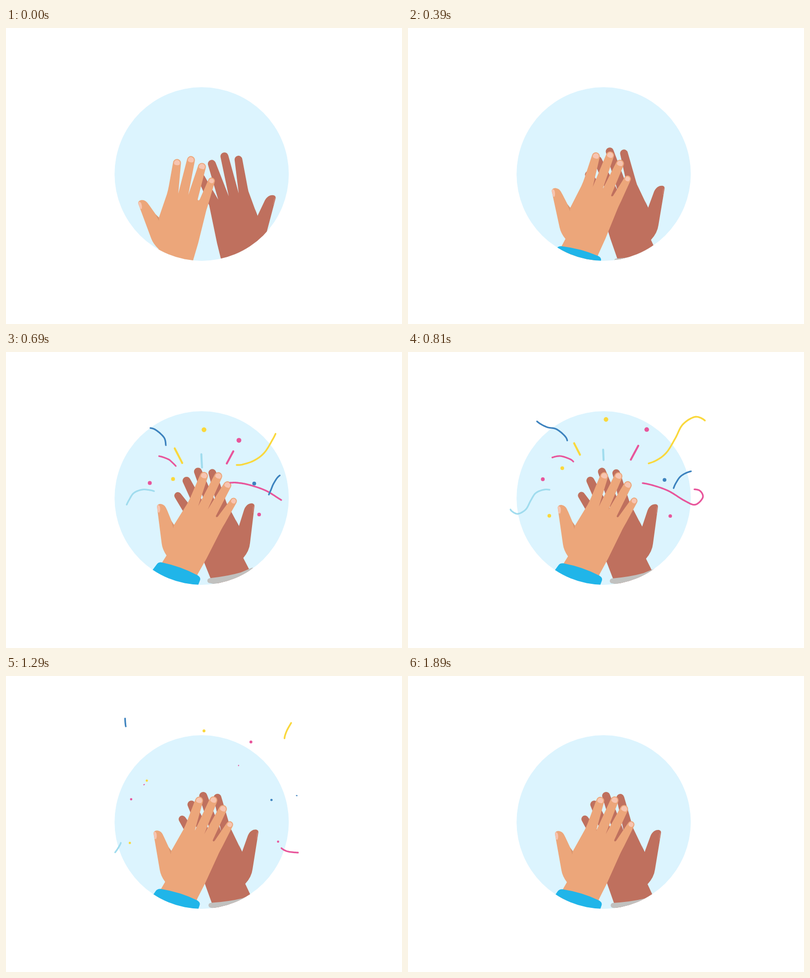
Recreate the animation shown at these times as an HTML page with a canvas. Size 800 by 600 pixels, loop 2.34 s.

```html
<!DOCTYPE html>
<html lang="en">
<head>
<meta charset="utf-8">
<title>High five</title>
<style>
html, body { margin: 0; width: 100%; height: 100%; overflow: hidden; background: #fff; }
canvas { display: block; width: 800px; height: 600px; }
</style>
</head>
<body>
<canvas id="stage" width="800" height="600"></canvas>
<script>
const ctx = document.getElementById('stage').getContext('2d');
const LOOP = 2340, STEP = 30, REST = 1890, CLAP = 500;
const YELLOW = '#fad83c', PINK = '#e8559b', BLUE = '#3c82be', PALE = '#a0dcee';
const RAD = Math.PI / 180;

function fill(color, d) {
  ctx.fillStyle = color;
  ctx.fill(new Path2D(d));
}

// fingers: tip x, tip y, radius, lean, then the web after the finger
function handPath(start, fingers, rest) {
  const p = new Path2D(start);
  for (const [x, y, r, lean, wx, wy] of fingers) {
    p.arc(x, y, r, Math.PI + lean, 2 * Math.PI + lean);
    p.lineTo(wx, wy);
  }
  const shape = new Path2D();
  shape.addPath(p);
  return { shape: p, rest };
}

const lightFingers = [
  [388.5, 252.8, 8, .29, 380, 314.5],
  [417.3, 252, 8, .38, 399.5, 320.5],
  [436.7, 269.5, 8, .44, 416.5, 333],
  [450.7, 301, 6.8, .5, 436, 346]
];
const darkFingers = [
  [357.5, 290, 7.2, -.55, 396, 331.5],
  [376.3, 260.5, 8, -.42, 416.5, 322.7],
  [400.2, 243, 8, -.34, 436, 315],
  [429, 246.8, 7.8, -.24, 453, 302]
];

function addFingers(list) {
  for (const [x, y, r, lean, wx, wy] of list) {
    ctx.arc(x, y, r, Math.PI + lean, 2 * Math.PI + lean);
    ctx.lineTo(wx, wy);
  }
}

function lightHand() {
  ctx.beginPath();
  ctx.moveTo(297, 321);
  ctx.bezierCurveTo(296, 315, 303, 313.5, 306, 314.5);
  ctx.bezierCurveTo(313, 316, 315, 321, 318, 327);
  ctx.lineTo(332, 357);
  ctx.lineTo(357, 312);
  ctx.quadraticCurveTo(361, 304, 364, 296);
  addFingers(lightFingers.slice(0, 3));
  ctx.quadraticCurveTo(417, 337, 420.5, 334);
  addFingers(lightFingers.slice(3));
  ctx.quadraticCurveTo(430, 357, 427, 364);
  for (const [x, y] of [[402, 420], [386, 452], [380, 470], [305, 450], [313, 432], [321, 418]]) ctx.lineTo(x, y);
  ctx.quadraticCurveTo(312, 406, 310, 394);
  ctx.closePath();
  ctx.fillStyle = '#eca67a';
  ctx.fill();

  fill('#d9956e', 'M332 362L327 347L333 355Z');
  fill('#f7c4b0', 'M297.3 320C297 315 302 316 303 321Q304.2 327 302 332L299 331Z');
  for (const [x, y, r, lean] of lightFingers) {
    const n = r - 1.9;
    ctx.save();
    ctx.translate(x, y);
    ctx.rotate(lean);
    ctx.beginPath();
    ctx.arc(0, 0, n, Math.PI, 2 * Math.PI);
    ctx.lineTo(n - .6, 3.2);
    ctx.quadraticCurveTo(0, 6.2, .6 - n, 3.2);
    ctx.fillStyle = '#f7c4b0';
    ctx.fill();
    ctx.restore();
  }
  fill('#20b5e9', 'M290 455L302 437Q305 432 312 432.3Q352 438.5 386 455Q393 459 391 465L386 480L300 480Z');
}

function darkHand() {
  ctx.beginPath();
  ctx.moveTo(402, 420);
  ctx.lineTo(379, 345);
  addFingers(darkFingers);
  ctx.quadraticCurveTo(455, 310, 458, 315);
  ctx.lineTo(478, 357);
  ctx.lineTo(490, 324);
  ctx.bezierCurveTo(495, 313, 503, 311, 508, 312.5);
  ctx.quadraticCurveTo(512, 314, 511, 319);
  ctx.lineTo(499, 392);
  ctx.quadraticCurveTo(497, 408, 484, 422);
  for (const [x, y] of [[496, 448], [480, 480], [420, 470], [416, 460]]) ctx.lineTo(x, y);
  ctx.closePath();
  ctx.fillStyle = '#bf705e';
  ctx.fill();

  fill('#ab6151', 'M478 357L472 343L476.5 356Z');
  fill('#cb8172', 'M510.5 317Q507.5 318 507.5 323L507 332L508.8 331Z');
  fill('#c1c1bf', 'M414.5 460Q452 457.5 478 451L502 442L506 470L470 485L414.5 470A5 5 0 0 1 414.5 460Z');
}

// Swing together, overshoot at the clap, then settle to rest
function pose(t, from, peak) {
  if (t < CLAP) {
    const k = Math.pow(t / CLAP, 2.6);
    return from.map((v, i) => v + (peak[i] - v) * k);
  }
  const k = t < REST ? Math.exp((CLAP - t) / 310) : 0;
  return peak.map(v => v * k);
}

function posed(draw, px, py, [dx, dy, deg]) {
  ctx.save();
  ctx.beginPath();
  ctx.arc(395.3, 296, 176, 0, 7);
  ctx.clip();
  ctx.translate(px + dx, py + dy);
  ctx.rotate(deg * RAD);
  ctx.translate(-px, -py);
  draw();
  ctx.restore();
}

// Dots fly out of one point: end x, end y, radius, colour, start, time constant
const dots = [
  [400, 108, 5, YELLOW, 380, 220],
  [496, 131.5, 5, PINK, 431, 195],
  [251, 249, 4.1, PINK, 431, 195],
  [538, 250.5, 4, BLUE, 431, 195],
  [551.5, 336, 3.8, PINK, 431, 195],
  [282, 210, 4, YELLOW, 545, 192],
  [247, 339, 4, YELLOW, 545, 192]
];

function drawDots(t) {
  const u = (t - 480) / 1250;
  if (u <= 0 || u >= 1) return;
  for (const [x, y, r, color, start, tau] of dots) {
    if (t < start) continue;
    const k = Math.exp((start - t) / tau);
    ctx.beginPath();
    ctx.arc(x + (400 - x) * k, y + (311 - y) * k, r * (1 - u * u), 0, 7);
    ctx.fillStyle = color;
    ctx.fill();
  }
}

// Timing of the trimmed lines: start, length, power, delay of the tail
const LONG = [560, 1200, 3.6, 228], SHORT = [545, 800, 4, 228], DASH = [530, 700, 4, 205];

function ribbon(color, width, timing, pts) {
  const n = pts.length / 2;
  const at = i => {
    const j = 2 * Math.max(0, Math.min(n - 1, i));
    return [pts[j], pts[j + 1]];
  };
  const line = [[...at(0), 0]];
  for (let i = 0; i < n - 1; i++) {
    const a = at(i - 1), b = at(i), c = at(i + 1), d = at(i + 2);
    for (let s = 1; s <= 12; s++) {
      const q = s / 12;
      const [x, y] = [0, 1].map(m => b[m] + .5 * q * (c[m] - a[m] +
        q * (2 * a[m] - 5 * b[m] + 4 * c[m] - d[m] + q * (3 * (b[m] - c[m]) + d[m] - a[m]))));
      const [lx, ly, len] = line[line.length - 1];
      line.push([x, y, len + Math.hypot(x - lx, y - ly)]);
    }
  }
  return { color, width, timing, line, total: line[line.length - 1][2] };
}

const ribbons = [
  ribbon(BLUE, 3.2, LONG, [323, 189, 319, 173, 300, 156.5, 280, 152, 260, 140, 248, 121, 242, 102, 240.5, 85, 241, 81]),
  ribbon(YELLOW, 3.4, LONG, [466, 229, 478, 228, 501, 220, 522, 204, 540, 175, 555, 147, 580, 131.5, 600, 139,
    603.5, 151, 585, 168, 568, 156, 562.5, 131, 566, 114, 575, 97, 582, 86]),
  ribbon(PINK, 3.3, LONG, [453, 265, 467, 265, 490, 269, 525, 281, 558, 301, 580, 309.5, 595.5, 295, 590, 281.5,
    575, 278.5, 556, 284, 545, 303, 546, 326, 553, 345, 567, 355, 590, 358, 601, 357]),
  ribbon(PALE, 3.3, LONG, [299, 282, 291, 280, 275, 279, 258, 286, 248, 301, 238, 319, 222, 328, 209, 322,
    207, 315, 212, 308, 222, 307, 232, 315, 234, 327, 232, 338, 227, 348, 220, 358, 215, 362]),
  ribbon(PINK, 3.2, SHORT, [343, 231, 335, 223, 327, 217, 308, 211, 291, 214, 278.5, 220.5]),
  ribbon(BLUE, 3.2, SHORT, [531, 289, 535, 280, 541, 266, 552, 251, 571, 242, 588, 242.5]),
  ribbon(PINK, 4, SHORT, [446, 226, 470, 181]),
  ribbon(YELLOW, 4, DASH, [356, 225, 332.5, 179]),
  ribbon(PALE, 4, DASH, [396, 234, 395, 216, 394, 192.5])
];

function progress(t, [start, length, power]) {
  const u = Math.max(0, Math.min(1, (t - start) / length));
  return 1 - Math.pow(1 - u, power);
}

function drawRibbons(t) {
  if (t >= REST) return;
  ctx.lineCap = ctx.lineJoin = 'round';
  for (const { color, width, timing, line, total } of ribbons) {
    const head = progress(t, timing) * total;
    const tail = progress(t - timing[3], timing) * total;
    if (head - tail < .4) continue;
    ctx.beginPath();
    for (let i = 1; i < line.length; i++) {
      const [ax, ay, a] = line[i - 1], [bx, by, b] = line[i];
      if (b <= tail || a >= head) continue;
      const mix = len => {
        const k = (len - a) / (b - a);
        return [ax + (bx - ax) * k, ay + (by - ay) * k];
      };
      if (a <= tail) ctx.moveTo(...mix(tail));
      ctx.lineTo(...mix(Math.min(b, head)));
    }
    ctx.strokeStyle = color;
    // caps lie inside the trimmed length once a piece gets short
    ctx.lineWidth = Math.min(width, 1.5 + (head - tail) * .5);
    ctx.stroke();
  }
}

function draw(t) {
  ctx.fillStyle = '#fff';
  ctx.fillRect(0, 0, 800, 600);
  ctx.beginPath();
  ctx.arc(395.3, 296, 176, 0, 7);
  ctx.fillStyle = '#dcf4fe';
  ctx.fill();
  posed(darkHand, 478, 357, pose(t, [30, 24, 5.4], [-13.8, -7.5, -4.6]));
  drawDots(t);
  posed(lightHand, 332, 361, pose(t, [-23, 29, -10.2], [11.3, -8.8, 5.3]));
  drawRibbons(t);
}

const begin = performance.now();
function tick() {
  const t = (performance.now() - begin) % LOOP;
  draw(Math.min(REST, Math.floor(t / STEP) * STEP));
  requestAnimationFrame(tick);
}
tick();
</script>
</body>
</html>
```
